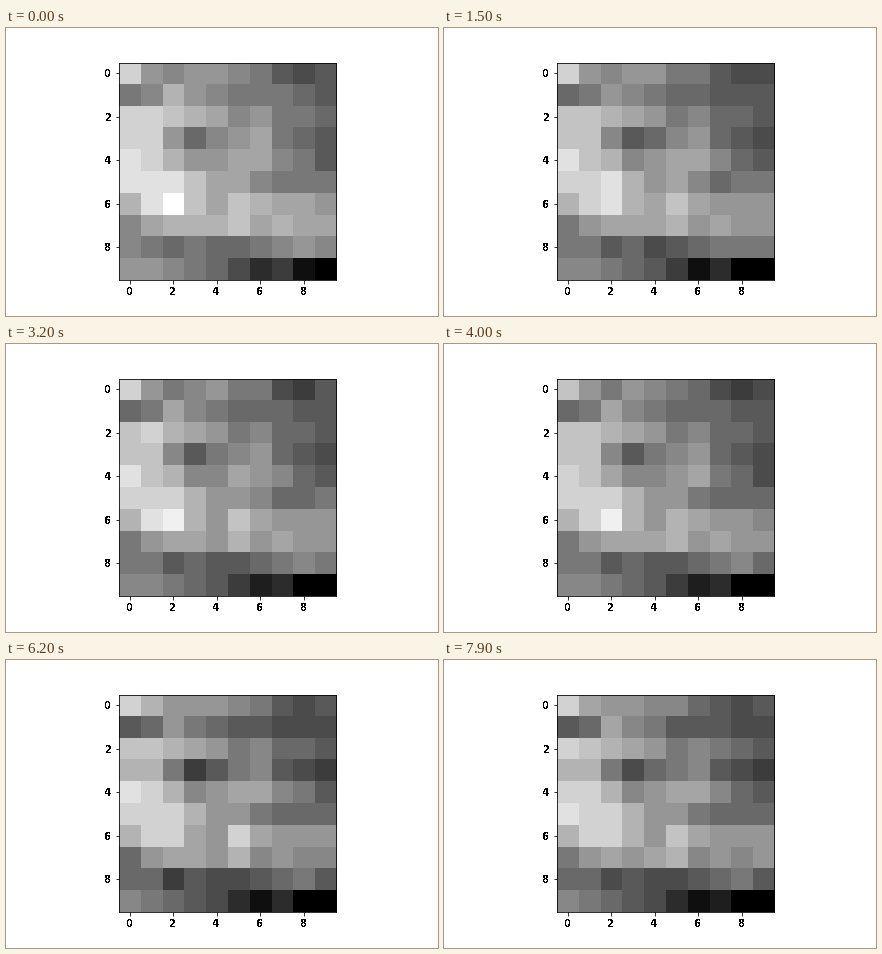
Animation of 432 by 288 pixels, one loop 8000 ms. Source, as a matplotlib script:

```python
import numpy as np
import matplotlib.pyplot as plt
from matplotlib.animation import FuncAnimation

FRAMES, INTERVAL = 80, 100
TOP_LEVEL = 17

plt.rcParams.update({
    "font.family": "DejaVu Sans",
    "font.size": 10,
    "font.weight": "bold",
    "text.antialiased": False,
    "figure.subplot.bottom": 0.125,
    "figure.subplot.top": 0.88,
})

# Resting level of each cell
base = np.array([
    [13, 9, 8, 9, 9, 8, 7, 5, 4, 5],
    [7, 8, 11, 9, 8, 7, 7, 7, 6, 6],
    [13, 13, 12, 11, 10, 8, 9, 7, 7, 6],
    [13, 13, 9, 6, 8, 9, 10, 7, 6, 5],
    [14, 13, 11, 9, 9, 10, 10, 8, 7, 5],
    [14, 14, 14, 12, 10, 10, 8, 7, 7, 7],
    [12, 14, 16, 12, 10, 12, 11, 10, 10, 9],
    [8, 10, 11, 11, 11, 12, 10, 11, 10, 10],
    [8, 8, 6, 7, 6, 6, 7, 8, 9, 8],
    [9, 9, 8, 7, 6, 4, 2, 3, 0, -2],
], dtype=float)

# How the field tilts as it swings away from rest
row_swing = [1, -0.5, 0.4, -1, 0.8, 0.5, 0.4, -0.4, -1, -0.6]
swing = np.repeat(np.array(row_swing)[:, None], 10, axis=1)
spots = {(0, 1): 2, (0, 2): 1, (1, 7): -1, (6, 2): -2.3, (6, 3): -1.4,
         (6, 5): 1.6, (6, 9): 1, (8, 9): -1}
for cell, extra in spots.items():
    swing[cell] += extra

KEYS = [0, 8, 22, 32, 49, 62, 79]
swing_at = np.interp(range(FRAMES), KEYS, [0, 1, 0, 0.3, 0, 1, 0.9])
lift_at = np.interp(range(FRAMES), KEYS, [0.9, 0.35, 0, 0.15, -0.2, -0.15, -0.1])


def field(i):
    jitter = np.random.default_rng(100 + i).normal(0, 0.22, base.shape)
    level = base + swing_at[i] * swing + lift_at[i] + jitter
    return np.clip(np.rint(level), 0, TOP_LEVEL)


fig, ax = plt.subplots(figsize=(6, 4), dpi=72)
image = ax.imshow(field(0), cmap="gray", vmin=0, vmax=TOP_LEVEL,
                  interpolation="nearest")
ax.set_xticks(range(0, 10, 2))
ax.set_yticks(range(0, 10, 2))


def update(i):
    image.set_data(field(i))
    return [image]


anim = FuncAnimation(fig, update, frames=FRAMES, interval=INTERVAL,
                     repeat=True, repeat_delay=0)
plt.show()
```
